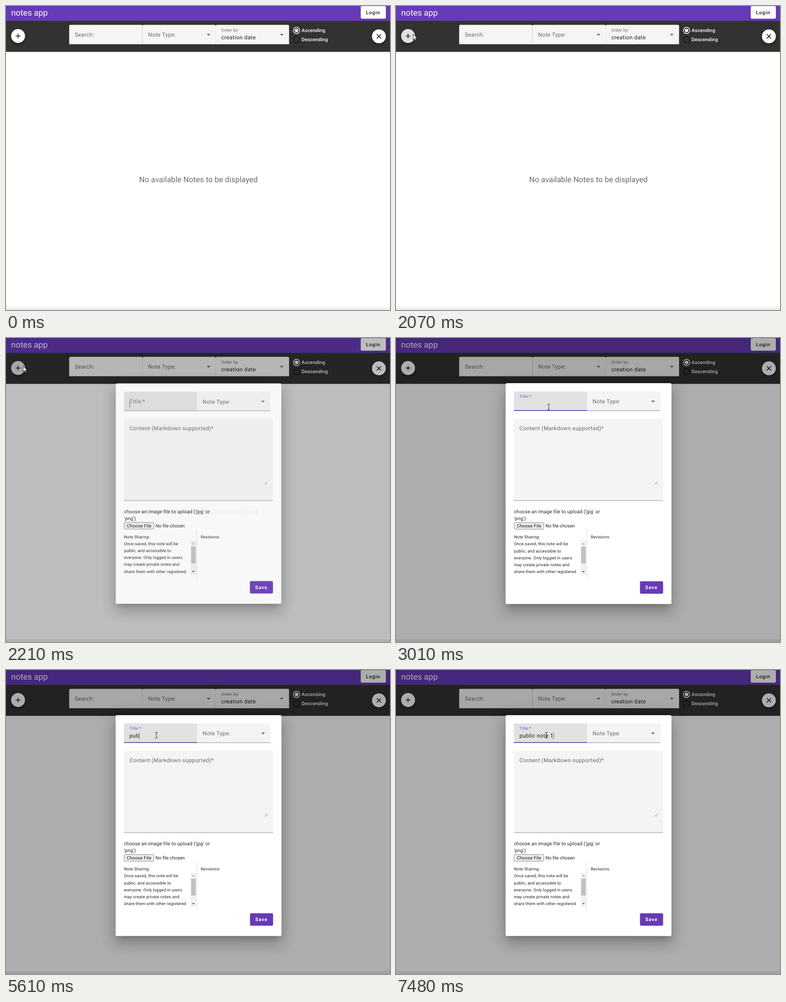
An HTML page that plays this animation: 840x666 px, repeating every 8000 ms.

```html
<!DOCTYPE html>
<html lang="en">
<head>
<meta charset="utf-8">
<title>Notes</title>
<style>
  html, body { margin: 0; width: 100%; height: 100%; overflow: hidden; background: #fff; }
  svg { display: block; width: 840px; height: 666px; font-family: Roboto, sans-serif; text-rendering: geometricPrecision; }
  text { white-space: pre; }
  .body { font-size: 12.1px; letter-spacing: .378px; }
  .float { font-size: 9.08px; letter-spacing: .28px; }
  .small { font-size: 10.6px; letter-spacing: .18px; }
  .cap { font-size: 9.08px; letter-spacing: .17px; }
  .btn { font-size: 10.6px; letter-spacing: .95px; font-weight: 500; }
  .file { font-size: 10.1px; }
  .hint { fill: #666; }
  .ink { fill: #212121; }
</style>
</head>
<body>
<svg viewBox="0 0 840 666">
  <defs>
    <filter id="b3" x="-50%" y="-50%" width="200%" height="200%"><feGaussianBlur stdDeviation="3"/></filter>
    <filter id="b6" x="-20%" y="-20%" width="140%" height="140%"><feGaussianBlur stdDeviation="5.7"/></filter>
    <filter id="b14" x="-20%" y="-20%" width="140%" height="140%"><feGaussianBlur stdDeviation="14.4"/></filter>
    <filter id="b17" x="-20%" y="-20%" width="140%" height="140%"><feGaussianBlur stdDeviation="17.4"/></filter>
    <path id="drop" d="M-4 -2H4L0 2.2Z" fill="#6b6b6b"/>
    <path id="field" d="M0 42.5V3A3 3 0 0 1 3 0H157.4A3 3 0 0 1 160.4 3V42.5Z"/>
  </defs>

  <rect width="840" height="666" fill="#fff"/>
  <rect y="660" width="840" height="6" fill="#efefef"/>
  <rect y="32" width="840" height="68.5" fill="#333232"/>
  <rect width="840" height="32.5" fill="#673ab7"/>
  <text x="11.3" y="20.5" font-size="18.15" fill="#fff">notes app</text>
  <rect x="776" y=".3" width="55" height="27.4" rx="3" fill="#fff"/>
  <text class="btn" x="787.6" y="17.7" fill="#111">Login</text>

  <g fill="#f5f5f3">
    <use href="#field" x="138.2" y="41.3"/>
    <use href="#field" x="298.5" y="41.3"/>
    <use href="#field" x="458.8" y="41.3"/>
  </g>
  <text class="body hint" x="150.4" y="67.3">Search:</text>
  <text class="body hint" x="310.7" y="67.3">Note Type:</text>
  <text class="float hint" x="471" y="56.2">Order by:</text>
  <text class="body ink" x="471" y="72.8">creation date</text>
  <use href="#drop" x="443" y="63"/>
  <use href="#drop" x="603.3" y="63"/>

  <circle cx="635.6" cy="53.5" r="6.9" fill="none" stroke="#fff" stroke-width="1.5"/>
  <circle cx="635.6" cy="53.5" r="3.8" fill="#fff"/>
  <circle cx="635.6" cy="74" r="6.9" fill="none" stroke="#151515" stroke-width="1.5"/>
  <g class="small" fill="#fff" font-weight="500">
    <text x="646.5" y="56.8">Ascending</text>
    <text x="646.5" y="77.3">Descending</text>
  </g>

  <circle cx="26.4" cy="69" r="15" opacity=".4" filter="url(#b3)"/>
  <circle cx="815.7" cy="69.5" r="15" opacity=".4" filter="url(#b3)"/>
  <circle id="add" cx="26.4" cy="65.8" r="15.2" fill="#fff"/>
  <circle cx="815.7" cy="66.4" r="15.2" fill="#fff"/>
  <g stroke="#111" stroke-width="1.5">
    <path d="M21.1 65.8H31.7M26.4 60.5V71.1"/>
    <path d="M811 61.7L820.4 71.1M820.4 61.7L811 71.1"/>
  </g>
  <text x="421" y="386.2" font-size="16.96" fill="#6c6c6c" text-anchor="middle">No available Notes to be displayed</text>

  <rect id="scrim" width="840" height="666" opacity="0"/>

  <g id="dialog">
    <rect x="245" y="112.5" width="352" height="473" opacity=".2" filter="url(#b6)"/>
    <rect x="237.5" y="115" width="367.5" height="488" opacity=".14" filter="url(#b14)"/>
    <rect x="234" y="100" width="375" height="495" opacity=".12" filter="url(#b17)"/>
    <rect x="239.8" y="99" width="362.8" height="483.7" rx="3" fill="#fff"/>

    <use id="titleBox" href="#field" x="257.8" y="117"/>
    <use href="#field" x="418.1" y="117" fill="#f4f4f4"/>
    <path d="M257.8 159.2H578.4" stroke="#8c8c8c"/>
    <path id="line" stroke="#673ab7" stroke-width="1.6"/>
    <text id="label" class="body">Title:*</text>
    <text id="typed" class="body ink" x="269.9" y="148.3"></text>
    <rect id="caret" y="137" width="1" height="14.4" fill="#5a3f94"/>
    <text class="body hint" x="430" y="143.3">Note Type:</text>
    <use href="#drop" x="562.3" y="139"/>

    <path id="content" d="M257.8 356V180A3 3 0 0 1 260.8 177H581.4A3 3 0 0 1 584.4 180V356Z"/>
    <path d="M257.8 356.3H584.4" stroke="#8c8c8c"/>
    <text class="body hint" x="269.9" y="202">Content (Markdown supported)*</text>
    <path d="M565 321L571.6 314.4M569 321L571.6 318.4" stroke="#777" stroke-width=".9"/>

    <g class="small ink">
      <text x="257.9" y="384.1">choose an image file to upload ('jpg' or</text>
      <text x="257.9" y="399.2">'png')</text>
    </g>
    <rect x="258.3" y="404.3" width="65" height="14.6" rx="2" fill="#efefef" stroke="#767676" stroke-width=".9"/>
    <text class="file" x="264" y="415.3" letter-spacing=".12" fill="#111">Choose File</text>
    <text class="file ink" x="327" y="415.3">No file chosen</text>

    <path d="M417.2 420V528" stroke="#d9d9d9"/>
    <text class="cap ink" x="257.9" y="439.3">Note Sharing:</text>
    <text class="cap ink" x="426" y="439.3">Revisions:</text>
    <g id="notice" class="cap ink"></g>
    <rect x="404" y="444" width="12" height="75" fill="#f1f1f1"/>
    <rect x="405" y="457" width="10" height="37" fill="#c1c1c1"/>
    <path d="M407 452.3H413L410 449.2Z" fill="#a3a3a3"/>
    <path d="M407 510.7H413L410 513.8Z" fill="#505050"/>

    <rect x="533.7" y="533" width="50.6" height="27.3" rx="3" fill="#673ab7"/>
    <text class="btn" x="545.2" y="550.2" fill="#fff" style="font-weight:700">Save</text>
  </g>

  <path id="arrow" d="M0 0V12.6L2.9 9.9L4.9 14.4L6.9 13.5L5 9.2H9Z" fill="#fff" stroke="#000" stroke-width=".8"/>
  <path id="beam" d="M-2.8 -6H-.8L0 -5.4L.8 -6H2.8M0 -5.4V5.4M-2.8 6H-.8L0 5.4L.8 6H2.8" fill="none" stroke="#222"/>
</svg>
<script>
const LOOP = 8000;
const $ = id => document.getElementById(id);
const set = (id, attrs) => { for (const k in attrs) $(id).setAttribute(k, attrs[k]); };
const show = (id, on) => set(id, { visibility: on ? 'inherit' : 'hidden' });
const mix = (a, b, p) => a + (b - a) * p;
const ease = p => p * p * (3 - 2 * p);
const gray = v => `rgb(${v},${v},${v})`;

// last row whose time has come
const at = (rows, t) => rows.reduce((hit, row) => row[0] <= t ? row : hit, null);

// [start, end, steps, x, y]: moves of the pointer, each from the end of the one before
const MOVES = [
  [390, 580, 4, 367, 298],
  [800, 800, 1, 358, 289],
  [920, 920, 1, 367, 298],
  [1060, 1740, 10, 37.5, 61.5],
  [2340, 2670, 6, 346, 240],
  [2740, 3010, 5, 334, 151],
  [3290, 3420, 2, 329, 143]
];

// time, scrim, opacity, scale, label lift, underline
const OPENING = [
  [0, 0, 0, .8, 0, 0],
  [2140, .165, .42, .96, 0, 0],
  [2210, .26, .9, .998, 0, 0],
  [2270, .305, 1, 1, .55, .45],
  [2340, .32, 1, 1, .95, .85],
  [2400, .32, 1, 1, 1, 1]
];

const ADD_FILL = [[0, 255], [1590, 248], [1660, 245], [1880, 236], [1940, 229], [2010, 225], [2340, 240], [2400, 255]];
const CARET = [[0, 0], [2210, 1], [2740, 0], [3290, 1], [3820, 0], [4280, 1]];
const TITLE = 'public note 1';
const KEYS = [4810, 5070, 5610, 5740, 5960, 6090, 6220, 6420, 6690, 6890, 7210, 7350, 7480];

['Once saved, this note will be', 'public, and accessible to', 'everyone. Only logged in users',
 'may create private notes and', 'share them with other registered'].forEach((line, i) => {
  const el = document.createElementNS('http://www.w3.org/2000/svg', 'text');
  el.textContent = line;
  el.setAttribute('x', 257.9);
  el.setAttribute('y', 454.4 + i * 15.14);
  $('notice').append(el);
});

function pointer(t) {
  let x = 757, y = 543;
  for (const [start, end, n, toX, toY] of MOVES) {
    if (t < start) break;
    const gap = (end - start) / (n - 1 || 1) || 1;
    const p = ease(Math.min(1, (Math.floor((t - start) / gap + .01) + 1) / n));
    x = mix(x, toX, p);
    y = mix(y, toY, p);
  }
  return [x, y];
}

function draw(t) {
  const [x, y] = pointer(t);
  const open = t >= 2140;
  const inContent = open && x > 258 && x < 584 && y > 177 && y < 356;
  const inTitle = open && x > 258 && x < 418 && y > 117 && y < 160;
  const isBeam = inContent || inTitle;
  set('arrow', { transform: `translate(${x} ${y})` });
  set('beam', { transform: `translate(${x} ${y})` });
  show('arrow', t >= 390 && !isBeam);
  show('beam', isBeam);

  const [, scrim, opacity, scale, lift, line] = at(OPENING, t);
  set('scrim', { opacity: scrim });
  show('dialog', open);
  set('dialog', { opacity, transform: `translate(421.2 340.8) scale(${scale}) translate(-421.2 -340.8)` });
  set('add', { fill: gray(at(ADD_FILL, t)[1]) });
  set('content', { fill: gray(inContent ? 236 : 244) });
  set('titleBox', { fill: gray(t < 2210 ? 244 : 225) });
  set('label', {
    transform: `translate(269.9 ${mix(142.9, 131.3, lift)}) scale(${mix(1, .75, lift)})`,
    fill: lift > .5 ? '#7a56bd' : '#777'
  });
  const half = 80.2 * line;
  set('line', { d: `M${338 - half} 158.7H${338 + half}`, opacity: line ? 1 : 0 });

  const count = KEYS.filter(k => k <= t).length;
  const typed = $('typed');
  typed.textContent = TITLE.slice(0, count);
  set('caret', { x: 269.9 + (count ? typed.getComputedTextLength() - .4 : 0) });
  show('caret', open && at(CARET, t)[1]);
}

const begin = performance.now();
function tick() {
  draw((performance.now() - begin) % LOOP);
  requestAnimationFrame(tick);
}
tick();
</script>
</body>
</html>
```
